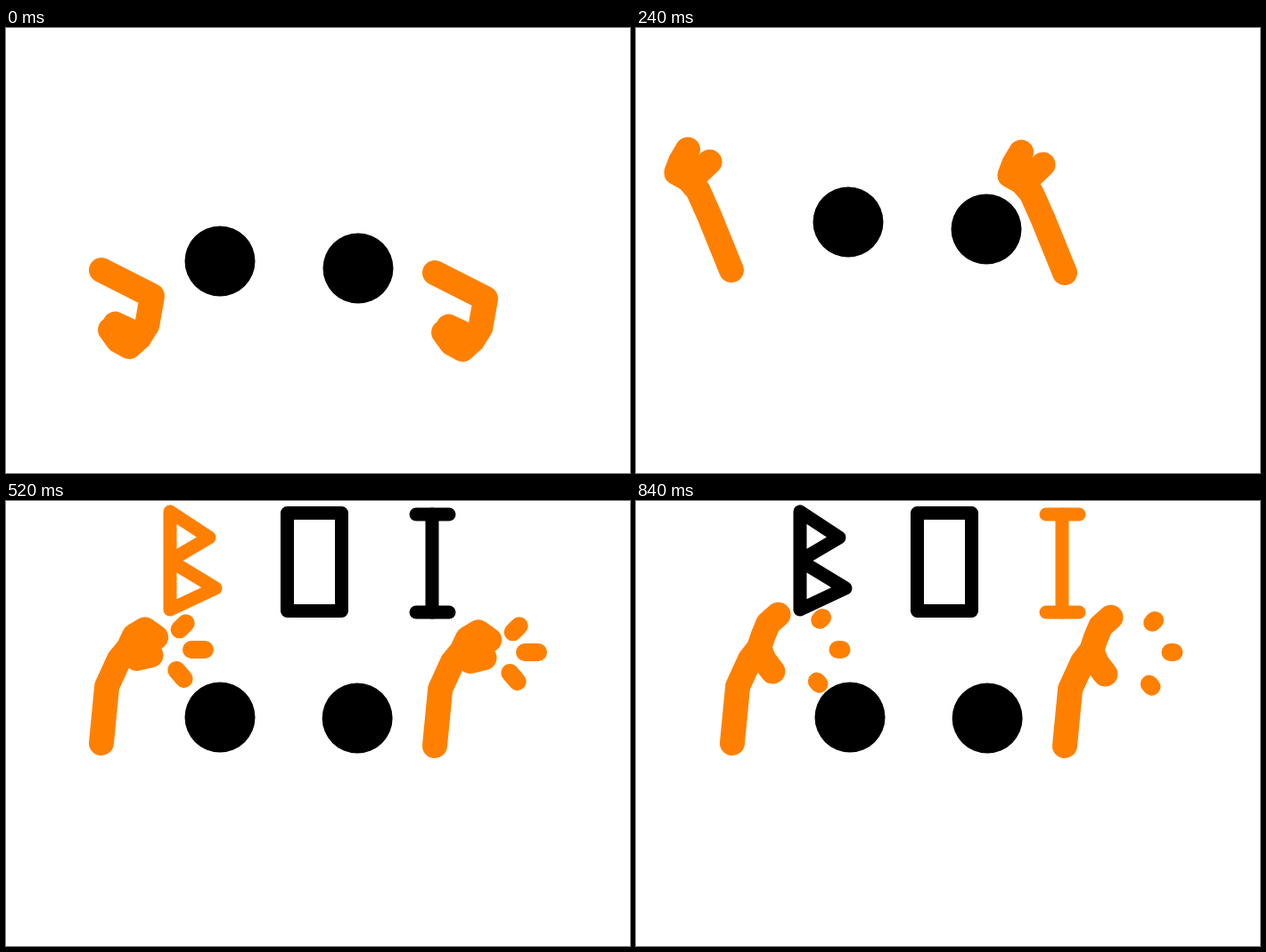
These frames come from a looping animation (700 by 500 pixels, 0.88 s). An HTML page with a canvas:

```html
<!DOCTYPE html>
<html lang="en">
<head>
<meta charset="utf-8">
<title>Snap</title>
<style>
  html, body { margin: 0; width: 100%; height: 100%; overflow: hidden; background: #fff; }
  canvas { display: block; }
</style>
</head>
<body>
<canvas id="stage" width="700" height="500"></canvas>
<script>
const ctx = document.getElementById('stage').getContext('2d');
const ORANGE = '#ff8000', BLACK = '#000';
const STEP = 40, LOOP = 880, SNAP = 520;
const SHOULDER = [107, 272], SPARK_CENTER = [172, 167];

// Bones: upper arm, forearm, palm, three of the finger, two of the thumb
const LENGTHS = [64, 33, 17, 15, 14, 15, 15, 16];

// Key times with joint bends in degrees and the left eye's x, y and the right eye's drop
const KEYS = [
  { time: 0, bends: [27, 73, 22, 16, 71, 25, 93, -10], eyes: [240, 262, 8] },
  { time: 160, bends: [-31, 38, 2, -1, 69, 20, 102, -10], eyes: [254, 233, 8] },
  { time: 240, bends: [-112, -2, -17, -20, 82, 10, 98, -11], eyes: [238, 218, 8] },
  { time: 400, bends: [-140, 0, -16, -9, 8, 14, 136, -18], eyes: [238, 250, 1] },
  { time: SNAP, bends: [-84.5, 19, 15, -15, 35, 66, 102, -65], eyes: [240, 243, 1] }
];
const OPEN_BENDS = [-84.5, 19, 13, -19, 4, 26, 121, -16];

const SPARKS = [
  { angle: -45, reach: 37, half: 5 },
  { angle: 0, reach: 43.5, half: 7.5 },
  { angle: 50, reach: 36.5, half: 6.5 }
];

const LETTERS = [
  () => line([184, 12], [228, 41], [184, 67], [235, 98], [184, 122], [184, 12]),
  () => ctx.strokeRect(315.5, 13.5, 61, 110),
  () => { line([460, 15], [497, 15]); line([478, 15], [478, 125]); line([460, 125], [497, 125]); }
];

const mix = (a, b, k) => a + (b - a) * k;

function polar([x, y], degrees, radius) {
  const angle = degrees * Math.PI / 180;
  return [x + radius * Math.cos(angle), y + radius * Math.sin(angle)];
}

// Smooth curve through the keys that turns only at a key
function sample(part, t) {
  const last = KEYS.length - 1;
  if (t >= SNAP) return KEYS[last][part];
  const n = KEYS.findIndex((key, i) => t < KEYS[i + 1].time);
  const from = KEYS[n], to = KEYS[n + 1];
  const span = to.time - from.time, k = (t - from.time) / span;
  return from[part].map((value, j) => {
    const slope = i => (KEYS[i + 1][part][j] - KEYS[i][part][j]) / (KEYS[i + 1].time - KEYS[i].time);
    const tangent = i => {
      if (i === 0) return 2 * slope(0) - tangent(1);
      if (i === last) return 2 * slope(last - 1) - tangent(last - 1);
      const before = slope(i - 1), after = slope(i);
      return before * after > 0 ? 2 * before * after / (before + after) : 0;
    };
    return mix(value, to[part][j], k * k * (3 - 2 * k))
      + span * k * (1 - k) * ((1 - k) * tangent(n) - k * tangent(n + 1));
  });
}

function pen(color, width) {
  ctx.strokeStyle = color;
  ctx.lineWidth = width;
}

function line(...points) {
  ctx.beginPath();
  points.forEach(p => ctx.lineTo(...p));
  ctx.stroke();
}

function disc(x, y) {
  ctx.fillStyle = BLACK;
  ctx.beginPath();
  ctx.arc(x, y, 39.5, 0, 2 * Math.PI);
  ctx.fill();
}

// Draws bones first..end-1 as one chain and returns its joints and total angles
function chain(origin, angle, bends, first, end) {
  const joints = [origin], angles = [angle];
  for (let i = first; i < end; i++) {
    angle += bends[i];
    joints.push(polar(joints[joints.length - 1], angle, LENGTHS[i]));
    angles.push(angle);
  }
  line(...joints);
  return { joints, angles };
}

function drawArm(x, y, bends, open, snapping) {
  ctx.save();
  ctx.translate(x, y);
  pen(ORANGE, 28);
  const arm = chain(SHOULDER, 0, bends, 0, 6);
  chain(arm.joints[3], arm.angles[3], bends, 6, 8);
  if (snapping) {
    pen(ORANGE, 20);
    SPARKS.forEach(({ angle, reach, half }) => {
      const middle = reach + 12 * open, size = mix(half, 2, open);
      line(polar(SPARK_CENTER, angle, middle - size), polar(SPARK_CENTER, angle, middle + size));
    });
  }
  ctx.restore();
}

function draw(t) {
  const snapping = t >= SNAP;
  const beat = snapping ? (t - SNAP) / STEP % 3 : 0;
  const open = beat / 2;
  const bends = sample('bends', t).map((bend, i) => mix(bend, OPEN_BENDS[i], open));
  const [eyeX, eyeY, drop] = sample('eyes', t);

  ctx.fillStyle = '#fff';
  ctx.fillRect(0, 0, 700, 500);
  ctx.lineCap = ctx.lineJoin = 'round';
  if (snapping) {
    LETTERS.forEach((letter, i) => {
      pen(i === beat ? ORANGE : BLACK, 15);
      letter();
    });
  }
  drawArm(open, 0, bends, open, snapping);
  disc(eyeX, eyeY);
  disc(eyeX + 154 + drop / 8, eyeY + drop);
  drawArm(374, 3, bends, open, snapping);
}

const start = performance.now();
function tick() {
  const t = Math.max(0, performance.now() - start) % LOOP;
  draw(Math.floor(t / STEP) * STEP);
  requestAnimationFrame(tick);
}
tick();
</script>
</body>
</html>
```
